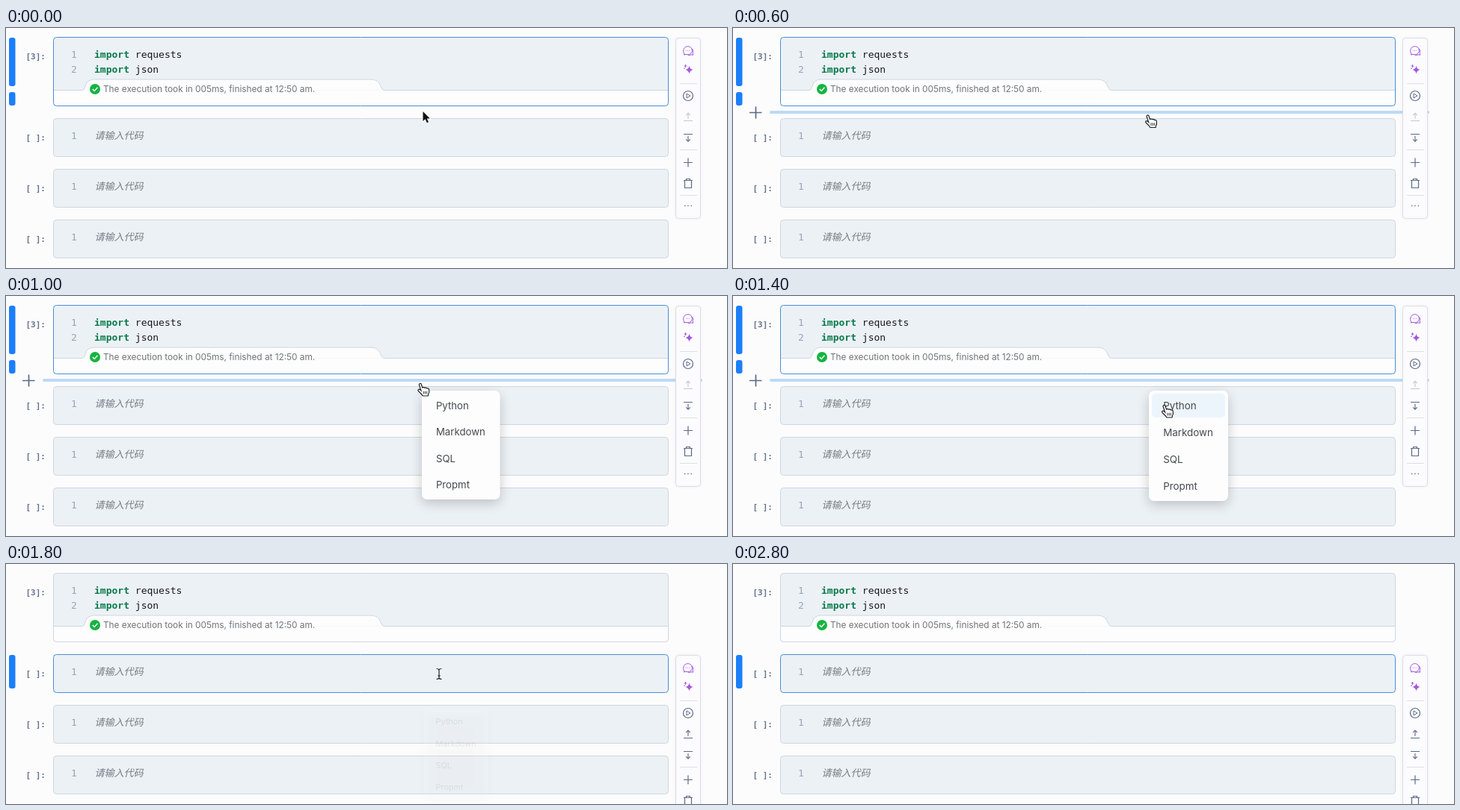
Recreate the animation shown at these times as an HTML page with a canvas. Size 964 px wide and 322 px high, loop 3 s.

```html
<!DOCTYPE html>
<html lang="zh">
<head>
<meta charset="utf-8">
<title>Notebook: insert a cell</title>
<style>
  html, body { margin: 0; width: 100%; height: 100%; overflow: hidden; background: #fcfcfd; }
  canvas { display: block; }
</style>
</head>
<body>
<canvas id="stage" width="964" height="322"></canvas>
<script>
const ctx = document.getElementById('stage').getContext('2d');
const LOOP = 3000, STEP = 200;
const MONO = '"DejaVu Sans Mono", monospace';
const SANS = 'Inter, "Open Sans", sans-serif';
const CJK = '"Noto Sans CJK SC", "Noto Sans CJK", sans-serif';
const PAPER = '#fcfcfd', CODE = '#ecf1f6', EDGE = '#cdd7df', ACTIVE = '#488fd3';
const BLUE = '#1a7ff8', INK = '#5c6a87', PURPLE = '#a458dc';

function text(str, x, y, font, color) {
  ctx.font = font;
  ctx.fillStyle = color;
  ctx.fillText(str, x, y);
}

function box(x, y, w, h, r, fill, stroke) {
  ctx.beginPath();
  ctx.roundRect(x, y, w, h, r);
  if (fill) { ctx.fillStyle = fill; ctx.fill(); }
  if (stroke) { ctx.strokeStyle = stroke; ctx.lineWidth = 1; ctx.stroke(); }
}

function trace(d, color, width = 1, fill) {
  const path = new Path2D(d);
  if (fill) { ctx.fillStyle = fill; ctx.fill(path); }
  if (!color) return;
  ctx.strokeStyle = color;
  ctx.lineWidth = width;
  ctx.stroke(path);
}

function at(x, y, draw, scale = 1) {
  ctx.save();
  ctx.translate(x, y);
  ctx.scale(scale, scale);
  draw();
  ctx.restore();
}

function prompt(label, y) {
  text(label, 26.5, y, `bold 11px ${MONO}`, '#66748e');
}

function lineNumber(n, y) {
  text(n, 87, y, `13px ${MONO}`, '#98a4bd');
}

function importLine(n, name, y) {
  lineNumber(n, y);
  text('import', 118, y, `bold 13px ${MONO}`, '#087b4b');
  text(name, 172.8, y, `13px ${MONO}`, '#15181c');
}

function executedCell(active) {
  box(63.5, 12.5, 822, 92, 4, CODE);
  box(64, 84, 821, 20, [0, 0, 4, 4], '#fdfdfe');
  trace('M64 83.5H101Q105 83.5 106 78Q108 69 118 69H488Q498 69 501 78Q502.5 83.5 507 83.5H885',
    EDGE, 1, '#fdfdfe');
  box(63.5, 12.5, 822, 92, 4, null, active ? ACTIVE : EDGE);
  prompt('[3]:', 42);
  importLine(1, 'requests', 40);
  importLine(2, 'json', 60);
  ctx.beginPath();
  ctx.arc(119, 82, 7, 0, 7);
  ctx.fillStyle = '#15b441';
  ctx.fill();
  trace('M115.8 82L118.2 84.4L122.4 79.8', '#fff', 1.5);
  text('The execution took in 005ms, finished at 12:50 am.', 130, 86.4, `11.8px ${SANS}`, '#717478');
}

function emptyCell(y, active) {
  box(63.5, y + .5, 822, 51, 4, CODE, active ? ACTIVE : EDGE);
  prompt('[ ]:', y + 29.5);
  lineNumber(1, y + 27.5);
  text('请输入代码', 118.5, y + 27.7, `italic 13px ${CJK}`, '#777c82');
}

// Icons are centred on x = 0; y runs down from the toolbar top.
function toolbar(top, canMoveUp) {
  ctx.save();
  ctx.shadowColor = 'rgba(40,50,80,.06)';
  ctx.shadowBlur = 4;
  box(895.5, top + .5, 33, 242, 4, '#fcfcfe', '#dedee8');
  ctx.restore();
  at(912, top, () => {
    trace('M-4.8 22.2Q-6.6 19.8 -6.3 17C-5.5 9.8 5 9.8 5.3 17C5.3 21.5 1.5 23.3 -2 22.4L-6 22.8Z', PURPLE);
    trace('M5 14.5Q8 17 6.2 20.6L6.8 23.2L4 22.8Q2 24 -.5 23.2M-3 17.2h.8M-.8 17.2h.8M1.5 17.2h.8', PURPLE);
    trace('M1.5 37.5Q2.2 42 6.5 43Q2.2 44 1.5 48.5Q.8 44 -3.5 43Q.8 42 1.5 37.5Z', null, 1, PURPLE);
    trace('M-3.5 36v4M-5.5 38h4M-6 41.2h2', PURPLE);
    ctx.beginPath();
    ctx.arc(0, 78, 6.5, 0, 7);
    ctx.strokeStyle = INK;
    ctx.lineWidth = 1.2;
    ctx.stroke();
    trace('M-2 75L3 78L-2 81Z', INK);
    trace('M-6 111.5H6M0 109V101.5M-2.8 104L0 101.2L2.8 104', canMoveUp ? INK : '#c2c8d3', 1.1);
    trace('M-6 129.5H6M0 132V139M-2.8 136.4L0 139.2L2.8 136.4', INK, 1.1);
    trace('M-6 167.5H6M0 161.5V173.5', INK, 1.2);
    trace('M-6 191.5H6M-2.5 191V189.5H2.5V191M-4.5 192V201.5H4.5V192', INK, 1.2);
    trace('M-5 225.5h1.3M-.7 225.5h1.3M3.6 225.5h1.3', INK, 1.3);
    trace('M-11 61.5H12M-11 150.5H12M-11 211.5H12', '#dde0e8');
  });
}

function insertBar() {
  box(49, 111, 882, 4, 2, '#bbdaf7');
  trace('M22 113.5H38.5M30.5 105.5V121.5', INK, 1.7);
}

function menu(hover) {
  ctx.save();
  ctx.shadowColor = 'rgba(0,0,0,.2)';
  ctx.shadowBlur = 16;
  ctx.shadowOffsetY = 5;
  box(0, 0, 106, 148, 7, '#fdfdfe');
  ctx.restore();
  if (hover) box(4, 4, 98, 32, 5, hover);
  ['Python', 'Markdown', 'SQL', 'Propmt'].forEach((item, i) =>
    text(item, 19.2, 25.2 + 36 * i, `13.4px ${SANS}`, '#45494f'));
}

function arrow() {
  trace('M0 0V13L3 10.3L5.3 15.3L7.6 14.2L5.3 9.4H9.3Z', '#fff', 2);
  trace('M0 0V13L3 10.3L5.3 15.3L7.6 14.2L5.3 9.4H9.3Z', null, 1, '#111');
}

function hand() {
  trace('M-2 1.5Q-1.5-.7 .7 .2L2.5 5.5Q4.5 4.3 5.3 5.8Q7.3 4.9 8.2 6.4Q10.8 5.8 11.3 8.2' +
    'Q12 12 10.5 14L10 16.5H3Q1 13.5-2.5 10.5Q-4.3 8.5-2.6 7.7Q-1.3 7.4 .6 9.3Z', '#1c1f24', 1.2, '#fff');
  trace('M4 10.3V14M6.2 10.3V14M8.3 10.3V14', '#1c1f24', .9);
}

function textCursor() {
  const beam = 'M-3.5-7Q-.5-7 0-5.5Q.5-7 3.5-7M0-5.5V5.5M-3.5 7Q-.5 7 0 5.5Q.5 7 3.5 7M-1.8 2.5H1.8';
  trace(beam, '#fff', 2.6);
  trace(beam, '#17191c', 1.2);
}

function pointer(time) {
  if (time < 600) at(557.5, 112, arrow);
  else if (time < 800) at(555, 117, hand);
  else if (time < 1200) at(554.3, 117.5, hand);
  else if (time < 1400) at(568, 134, hand);
  else if (time < 1600) at(577, 146.5, hand);
  else if (time < 1800) at(578, 147.5, hand);
  else if (time < 2600) at(579, 147.5, textCursor);
}

function render(time) {
  const inserted = time >= 1800;
  ctx.fillStyle = PAPER;
  ctx.fillRect(0, 0, 964, 322);

  if (inserted) {
    box(4, 122, 8.5, 45, 3, BLUE);
  } else {
    box(4, 13, 8.5, 65, 3, BLUE);
    box(4, 86, 8.5, 18, 3, BLUE);
  }
  executedCell(!inserted);
  [121, 189, 257].forEach((y, i) => emptyCell(y, inserted && i === 0));
  if (time >= 600 && time < 1600) insertBar();
  toolbar(inserted ? 122 : 13, inserted);

  if (time >= 1000 && time < 1800) {
    const hover = time < 1400 ? null : time < 1600 ? '#edf5fc' : '#e0f2fd';
    at(556, 127, () => menu(hover), time < 1200 ? .986 : 1);
  } else if (inserted && time < 2200) {
    ctx.globalAlpha = .1;
    at(559, 195, () => menu(), .81);
    ctx.globalAlpha = 1;
  }
  pointer(time);
}

function tick() {
  const time = performance.now() % LOOP;
  render(Math.floor(time / STEP) * STEP);
  requestAnimationFrame(tick);
}
tick();
</script>
</body>
</html>
```
